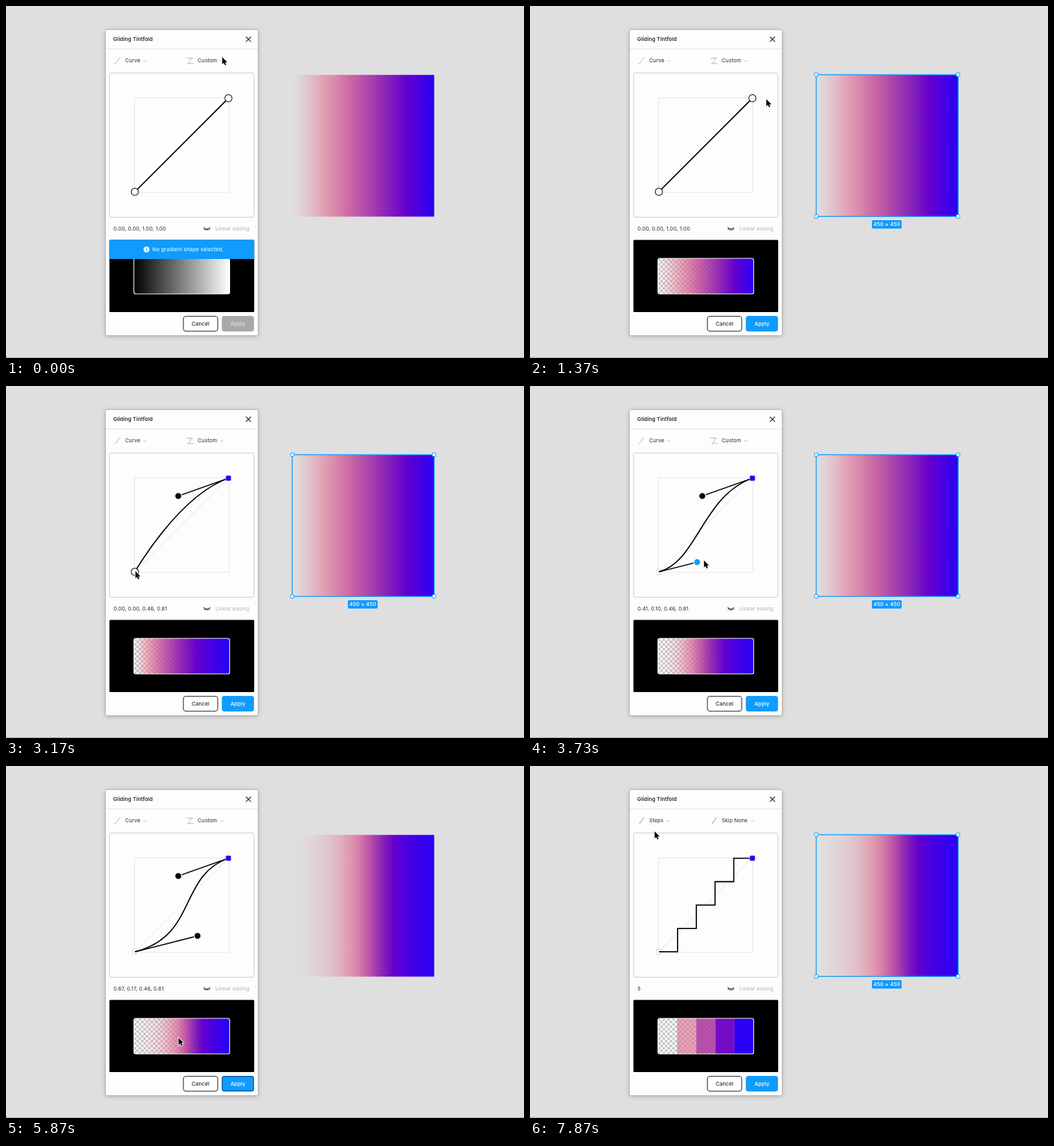
These frames come from a looping animation (800 px wide and 544 px high, 8000 ms). An HTML page with a canvas:

```html
<!DOCTYPE html>
<html lang="en">
<head>
<meta charset="utf-8">
<title>Gradient editor</title>
<style>
  html, body { margin: 0; width: 100%; height: 100%; overflow: hidden; background: #e0dfe0; }
  canvas { display: block; width: 800px; height: 544px; }
</style>
</head>
<body>
<canvas id="stage" width="800" height="544"></canvas>
<script>
const ctx = document.getElementById('stage').getContext('2d');
const LOOP = 8000;
const BLUE = '#0f9cfd', INK = '#2a2a2a', MUTED = '#b3b3b3';
const LAG = 38; // dragged handles trail the pointer

// Moments at which the state switches
const AT = {
  select: 700, preview: 760,
  endGrab: 1740, endDrag: 1780, endStop: 2360, endDrop: 2560,
  startGrab: 3360, startDrag: 3400, startStop: 3910, startDrop: 4180,
  press: 4930, applied: 5000, deselect: 5200, reselect: 6900,
  menuOpen: 6940, steps: 7720
};

// Pointer tip: time, x, y
const PATH = [
  [0, 334, 79], [60, 334, 79], [310, 390, 52], [640, 478, 152], [790, 478, 152],
  [1568, 343.5, 142.5], [1780, 343.5, 142.5], [2360, 266.5, 168.5], [2560, 266.5, 168.5],
  [3200, 199.5, 287], [3400, 199.5, 287], [3910, 296, 262.6], [4180, 296, 262.6],
  [4741, 366, 492], [5150, 366, 492], [5700, 266.5, 420], [5950, 266.5, 420],
  [6780, 190, 88], [7150, 190, 88], [7500, 192.5, 101], [8000, 192.5, 101]
];

// Position, r, g, b, alpha
const STOPS = [
  [0, 224, 150, 175, 0], [.22, 226, 118, 150, .6], [.4, 200, 75, 150, .8],
  [.6, 150, 40, 172, .93], [.8, 100, 0, 205, 1], [1, 44, 0, 245, 1]
];

const clamp = v => Math.min(1, Math.max(0, v));
const mix = (a, b, p) => a + (b - a) * p;
const smooth = p => p * p * (3 - 2 * p);
const during = (t, a, b) => smooth(clamp((t - a) / (b - a)));

function pointerAt(t) {
  const i = Math.max(1, PATH.findIndex(k => k[0] >= t));
  const a = PATH[i - 1], b = PATH[i];
  const p = during(t, a[0], b[0]);
  return [mix(a[1], b[1], p), mix(a[2], b[2], p)];
}

function bezierEase([x1, y1, x2, y2]) {
  const at = (a, b, s) => 3 * a * s * (1 - s) ** 2 + 3 * b * s * s * (1 - s) + s ** 3;
  return x => {
    let lo = 0, hi = 1;
    for (let i = 0; i < 18; i++) {
      const mid = (lo + hi) / 2;
      if (at(x1, x2, mid) < x) lo = mid; else hi = mid;
    }
    return at(y1, y2, (lo + hi) / 2);
  };
}

function colorAt(p) {
  const i = Math.max(1, STOPS.findIndex(s => s[0] >= p - 1e-6));
  const a = STOPS[i - 1], b = STOPS[i];
  const q = clamp((p - a[0]) / (b[0] - a[0]));
  const [r, g, bl, al] = [1, 2, 3, 4].map(k => mix(a[k], b[k], q));
  return `rgba(${r},${g},${bl},${al})`;
}

function easedGradient(x, w, ease) {
  const g = ctx.createLinearGradient(x, 0, x + w, 0);
  for (let i = 0; i <= 50; i++) g.addColorStop(i / 50, colorAt(clamp(ease(i / 50))));
  return g;
}

function box(x, y, w, h, r, fill, stroke, lw = 1) {
  ctx.beginPath();
  ctx.roundRect(x, y, w, h, r);
  paint(fill, stroke, lw);
}

function dot(x, y, r, fill, stroke, lw = 1) {
  ctx.beginPath();
  ctx.arc(x, y, r, 0, Math.PI * 2);
  paint(fill, stroke, lw);
}

function paint(fill, stroke, lw) {
  if (fill) { ctx.fillStyle = fill; ctx.fill(); }
  if (stroke) { ctx.strokeStyle = stroke; ctx.lineWidth = lw; ctx.stroke(); }
}

function line(points, color, lw = 1) {
  ctx.beginPath();
  points.forEach(([x, y]) => ctx.lineTo(x, y));
  paint(null, color, lw);
}

function text(str, x, cy, color = INK, weight = 400, align = 'left') {
  ctx.font = `${weight} 8.1px Inter, sans-serif`;
  ctx.letterSpacing = '0.1px';
  ctx.textAlign = align;
  ctx.fillStyle = color;
  ctx.fillText(str, x, cy + 2.95);
  return ctx.measureText(str).width;
}

function stairs(x, y, size, n, color, lw) {
  const pts = [];
  for (let k = 0; k < n; k++) {
    const sy = y - size * k / (n - 1);
    pts.push([x + size * k / n, sy], [x + size * (k + 1) / n, sy]);
  }
  line(pts, color, lw);
}

function scurve(x1, y1, x2, y2) {
  const m = (x1 + x2) / 2;
  ctx.beginPath();
  ctx.moveTo(x1, y1);
  ctx.bezierCurveTo(m + 1, y1, m - 1, y2, x2, y2);
  paint(null, MUTED, 1);
}

function dropdown(label, x) {
  const cx = x + text(label, x, 84.5) + 7;
  line([[cx - 2.3, 83.7], [cx, 86], [cx + 2.3, 83.7]], MUTED, 1);
}

function drawShape(s) {
  ctx.fillStyle = easedGradient(442, 219, s.shapeEase);
  ctx.fillRect(442, 106.5, 219.3, 219);
  if (!s.selected) return;
  ctx.strokeStyle = BLUE;
  ctx.lineWidth = 1.4;
  ctx.strokeRect(442, 106.2, 219.3, 219);
  for (const x of [442.2, 661.2])
    for (const y of [106.2, 325.2]) box(x - 2.6, y - 2.6, 5.2, 5.2, .5, '#fff', BLUE, 1);
  box(528, 331, 46, 13, 2, BLUE);
  text('450 × 450', 551, 337.5, '#fff', 500, 'center');
}

function drawPanel() {
  ctx.save();
  ctx.shadowColor = 'rgba(0,0,0,.28)';
  ctx.shadowBlur = 7;
  ctx.shadowOffsetY = 1;
  box(154, 37, 235, 472, 2, '#fefdfe');
  ctx.restore();
  box(153.7, 36.7, 235.6, 472.6, 2, null, 'rgba(0,0,0,.16)', .7);
  text('Gliding Tintfold', 165.5, 51.5, INK, 600);
  line([[370.5, 47.5], [378.3, 55.3]], '#222', 1.2);
  line([[378.3, 47.5], [370.5, 55.3]], '#222', 1.2);
  line([[154, 66.5], [389, 66.5]], '#e2e2e2');
}

function drawOptions(s) {
  if (s.steps) {
    stairs(168, 89, 9, 4, MUTED, 1);
    stairs(280, 89, 9, 4, MUTED, 1);
  } else {
    scurve(167.5, 89, 177, 80);
    scurve(280, 89, 289, 80.5);
    line([[278.5, 80.5], [287, 80.5]], MUTED);
    line([[281.5, 89], [290, 89]], MUTED);
  }
  dropdown(s.steps ? 'Steps' : 'Curve', 184);
  dropdown(s.steps ? 'Skip None' : 'Custom', 296);
}

const gx = v => 199 + 144.5 * v;
const gy = v => 287.2 - 144.7 * v;

function arm(x0, y0, x, y, active) {
  line([[x0, y0], [x, y]], '#000', 1.6);
  dot(x, y, 5.9, '#fefdfe');
  dot(x, y, 4.6, active ? BLUE : '#000');
}

function drawGraph(s) {
  box(160, 103.5, 223, 223, 3, '#fefdfe', '#c9c9c9');
  ctx.strokeStyle = '#e4e3e4';
  ctx.lineWidth = 1;
  ctx.strokeRect(198.5, 142, 146, 146);
  line([[gx(0), gy(0)], [gx(1), gy(1)]], '#e4e3e4');

  const [x1, y1, x2, y2] = s.curve;
  if (s.startSet) box(gx(0) - 4, gy(0) - 4, 8, 8, 2, '#fefdfe', '#d6d5d6');
  if (s.steps) {
    stairs(gx(0), gy(0), 144.6, 5, '#000', 1.8);
  } else {
    ctx.beginPath();
    ctx.moveTo(gx(0), gy(0));
    ctx.bezierCurveTo(gx(x1), gy(y1), gx(x2), gy(y2), gx(1), gy(1));
    paint(null, '#000', 1.8);
    if (s.endSet) arm(gx(1), gy(1), gx(x2), gy(y2), s.endActive);
    if (s.startSet) arm(gx(0), gy(0), gx(x1), gy(y1), s.startActive);
  }
  if (!s.startSet) dot(gx(0), gy(0), 5.6, '#fff', '#111', 1.1);
  if (s.endSet) box(gx(1) - 4.2, gy(1) - 4.2, 8.4, 8.4, 2, '#3000ea', '#d9d2f2', .7);
  else dot(gx(1), gy(1), 5.6, '#fff', '#111', 1.1);

  text(s.steps ? '5' : s.curve.map(v => v.toFixed(2)).join(', '), 166, 344);
  drawEye();
  text('Linear easing', 376, 344, MUTED, 400, 'right');
}

function drawEye() {
  ctx.beginPath();
  ctx.moveTo(305.3, 342.2);
  ctx.quadraticCurveTo(310.3, 347.6, 315.3, 342.2);
  paint(null, '#222', 1.1);
  for (const d of [-1, 1]) {
    line([[310.3 + d * 3.4, 344], [310.3 + d * 4.7, 346]], '#222', 1);
    line([[310.3 + d * 1.2, 344.8], [310.3 + d * 1.7, 347.2]], '#222', 1);
  }
}

function drawPreview(s) {
  const x = 197.5, y = 390, w = 148, h = 55;
  box(159.7, 361.5, 223.6, 111.5, 1.5, '#000');
  ctx.save();
  ctx.beginPath();
  ctx.roundRect(x, y, w, h, 3);
  ctx.clip();
  if (s.live) {
    const cell = 3.7;
    ctx.fillStyle = '#fff';
    ctx.fillRect(x, y, w, h);
    ctx.fillStyle = '#c4c4c4';
    for (let r = 0; r * cell < h; r++)
      for (let c = r % 2; c * cell < w; c += 2) ctx.fillRect(x + c * cell, y + r * cell, cell, cell);
    if (s.steps) {
      for (let k = 0; k < 5; k++) {
        ctx.fillStyle = colorAt(k / 4);
        ctx.fillRect(x + w * k / 5, y, w / 5, h);
      }
    } else {
      ctx.fillStyle = easedGradient(x, w, bezierEase(s.curve));
      ctx.fillRect(x, y, w, h);
    }
  } else {
    const g = ctx.createLinearGradient(x, 0, x + w, 0);
    g.addColorStop(0, '#000');
    g.addColorStop(1, '#fff');
    ctx.fillStyle = g;
    ctx.fillRect(x, y, w, h);
  }
  ctx.restore();
  box(x, y, w, h, 3, null, '#fff', 1.1);
  if (s.live) return;
  ctx.fillStyle = BLUE;
  ctx.fillRect(159.7, 361.5, 223.6, 29.5);
  dot(217, 376.3, 4.6, '#fff');
  ctx.fillStyle = BLUE;
  ctx.fillRect(216.4, 373.5, 1.4, 1.4);
  ctx.fillRect(216.4, 375.7, 1.4, 3.2);
  text('No gradient shape selected.', 226, 376.3, '#fff');
}

function drawButtons(s) {
  box(274, 479.5, 53, 23, 4, '#fff', '#222', 1.1);
  text('Cancel', 300.5, 491.2, INK, 500, 'center');
  box(333.3, 479, 49.7, 24, 4, s.live ? BLUE : '#a9a9a9');
  if (s.focused) box(334, 479.6, 48.4, 22.8, 3.5, null, 'rgba(0,20,50,.6)', 1.2);
  text('Apply', 358.2, 491.2, s.live ? '#fff' : '#e2e2e2', 500, 'center');
}

function drawMenu(py) {
  ctx.save();
  ctx.shadowColor = 'rgba(0,0,0,.2)';
  ctx.shadowBlur = 3;
  box(157, 72, 104, 42, 2, '#222');
  ctx.restore();
  const row = py < 93 ? 0 : 1;
  ctx.fillStyle = BLUE;
  ctx.fillRect(157, 75.7 + row * 17.5, 104, 17.5);
  line([[167, 84.5], [169.5, 87], [174, 82]], '#fff', 1.1);
  text('Curve', 184, 84.5, '#fff');
  text('Steps', 184, 102, '#fff');
}

function drawPointer(x, y) {
  ctx.save();
  ctx.translate(x, y);
  ctx.lineJoin = 'round';
  ctx.beginPath();
  for (const [px, py] of [[0, 0], [0, 11], [2.4, 8.8], [4.1, 12.5], [6, 11.7], [4.4, 8.1], [7.8, 8]]) ctx.lineTo(px, py);
  ctx.closePath();
  paint(null, '#fff', 1.8);
  paint('#000');
  ctx.restore();
}

function stateAt(t) {
  const between = (a, b) => t >= a && t < b;
  const e = during(t - LAG, AT.endDrag, AT.endStop);
  const b = during(t - LAG, AT.startDrag, AT.startStop);
  const curve = [.67 * b, .17 * b, mix(1, .464, e), mix(1, .81, e)];
  return {
    curve,
    shapeEase: t < AT.applied ? x => x : bezierEase(curve),
    selected: between(AT.select, AT.deselect) || t >= AT.reselect,
    live: t >= AT.preview,
    endSet: t >= AT.endGrab,
    endActive: between(AT.endGrab, AT.endDrop),
    startSet: t >= AT.startGrab,
    startActive: between(AT.startGrab, AT.startDrop),
    focused: between(AT.press, AT.reselect),
    menu: between(AT.menuOpen, AT.steps),
    steps: t >= AT.steps
  };
}

function draw(t) {
  const s = stateAt(t);
  const [px, py] = pointerAt(t);
  ctx.fillStyle = '#e0dfe0';
  ctx.fillRect(0, 0, 800, 544);
  ctx.fillStyle = '#a6a5a6';
  ctx.fillRect(0, 543, 800, 1);
  drawShape(s);
  drawPanel();
  drawOptions(s);
  drawGraph(s);
  drawPreview(s);
  drawButtons(s);
  if (s.menu) drawMenu(py);
  drawPointer(px, py);
}

const start = performance.now();
function tick() {
  draw((performance.now() - start) % LOOP);
  requestAnimationFrame(tick);
}
tick();
</script>
</body>
</html>
```
